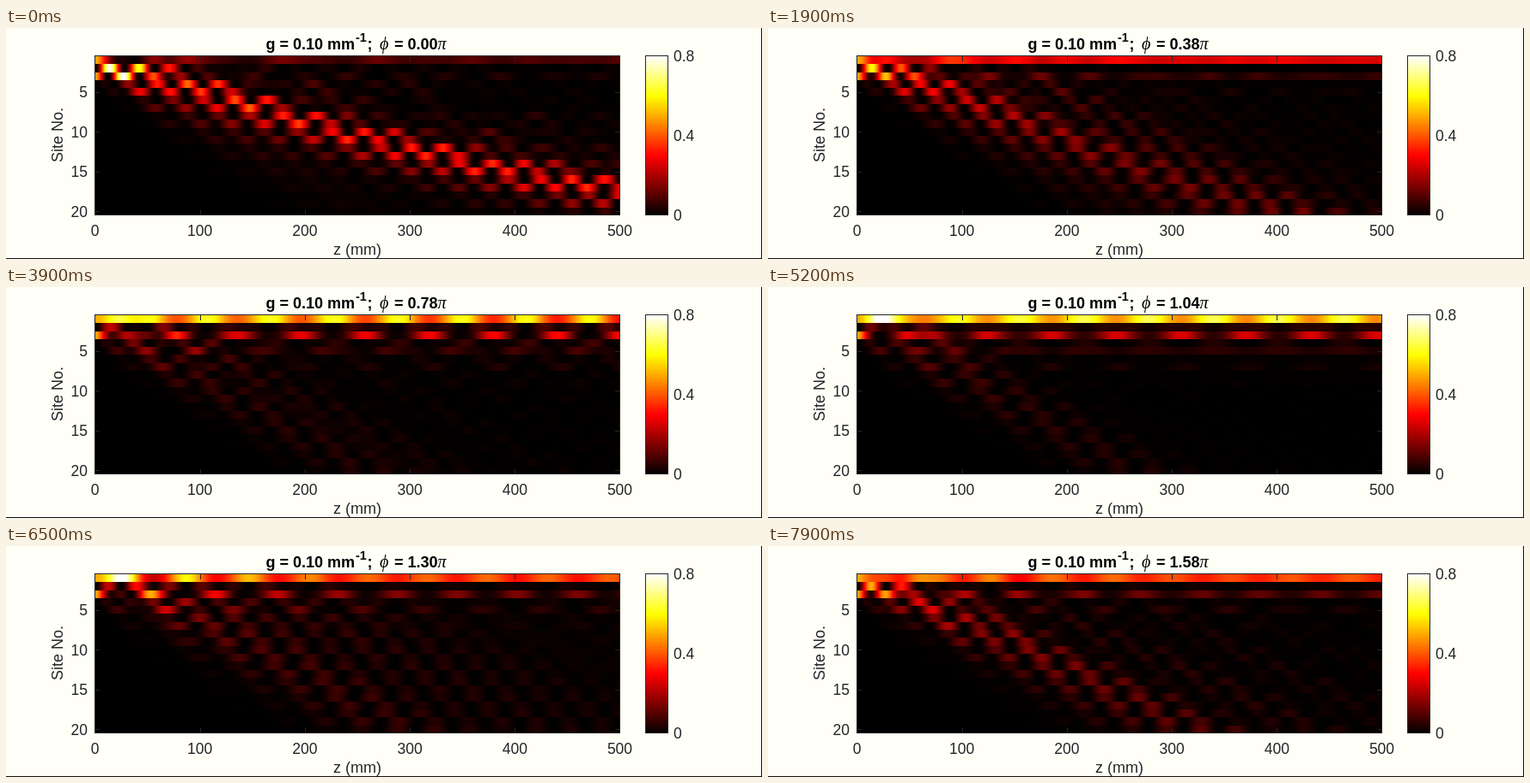
Animation of 880 by 270 pixels, one loop 8 s. Source, as an HTML page with a canvas:

```html
<!DOCTYPE html>
<html lang="en">
<head>
<meta charset="utf-8">
<title>Light in a dimerised lattice</title>
<style>
html, body { margin: 0; width: 880px; height: 270px; overflow: hidden; background: #fffff8; }
canvas, svg { position: absolute; left: 0; top: 0; display: block; }
text { font-family: "Liberation Sans", Arial, sans-serif; fill: #262626; white-space: pre; }
.tick { font-size: 17.5px; }
.label { font-size: 18px; }
.title { font-size: 18px; font-weight: bold; fill: #000; }
.sup { font-size: 14.4px; font-weight: bold; fill: #000; }
.greek { font-family: "Liberation Serif", "Times New Roman", serif; font-style: italic; font-size: 20px; fill: #000; }
</style>
</head>
<body>
<canvas id="stage" width="880" height="270"></canvas>
<svg id="labels" width="880" height="270"></svg>
<script>
const LEFT = 103, TOP = 33, W = 612, H = 186, ROWS = 20;
const BAR = { x: 745, w: 26 };
const LENGTH = 500, I_MAX = 0.8;
const SITES = 64, J1 = 0.04, J2 = 0.1, G = 0.1;
const STEP_MS = 100, STEPS = 80;

const ctx = document.getElementById("stage").getContext("2d");
const svg = document.getElementById("labels");

// black - red - yellow - white
function hot(v) {
  const c = x => 255 * Math.max(0, Math.min(1, x));
  return [c(v * 8 / 3), c(v * 8 / 3 - 1), c(v * 4 - 3)];
}

function label(str, x, y, cls, anchor = "start", turn = 0) {
  const el = document.createElementNS("http://www.w3.org/2000/svg", "text");
  el.textContent = str;
  el.setAttribute("class", cls);
  el.setAttribute("x", x);
  el.setAttribute("y", y);
  el.setAttribute("text-anchor", anchor);
  if (turn) el.setAttribute("transform", `rotate(${turn} ${x} ${y})`);
  svg.appendChild(el);
  return el;
}

const zToX = z => LEFT + 0.5 + z / LENGTH * (W - 1);
const siteToY = n => TOP + (n - 0.5) * H / ROWS;

label("g = 0.10 mm", 302.5, 25, "title");
label("-1", 407, 16, "sup");
label(";", 420.5, 25, "title");
label("ϕ", 435, 25, "greek");
label("=", 452, 25, "title");
const phaseText = label("0.00", 467.5, 25, "title");
label("π", 502.5, 25, "greek");
for (let z = 0; z <= LENGTH; z += 100) label(z, zToX(z), 243, "tick", "middle");
for (let n = 5; n <= ROWS; n += 5) label(n, 95, siteToY(n) + 6.3, "tick", "end");
["0.8", "0.4", "0"].forEach((s, i) => label(s, 777, TOP + i * H / 2 + 5.7, "tick"));
label("z (mm)", 409, 265, "label", "middle");
label("Site No.", 66, 125, "label", "middle", -90);

// d(psi)/dz = i (coupling + G |psi|^2 psi), real and imaginary parts interleaved
function slope(p, out) {
  for (let n = 0; n < SITES; n++) {
    const k = 2 * n;
    const a = n % 2 ? J1 : J2, b = n % 2 ? J2 : J1;
    const kerr = G * (p[k] * p[k] + p[k + 1] * p[k + 1]);
    let re = kerr * p[k], im = kerr * p[k + 1];
    if (n > 0) { re += a * p[k - 2]; im += a * p[k - 1]; }
    if (n < SITES - 1) { re += b * p[k + 2]; im += b * p[k + 3]; }
    out[k] = -im;
    out[k + 1] = re;
  }
}

const vec = () => new Float64Array(2 * SITES);
const k1 = vec(), k2 = vec(), k3 = vec(), k4 = vec(), tmp = vec();

function advance(p, h) {
  const shift = (k, s) => { for (let i = 0; i < p.length; i++) tmp[i] = p[i] + s * k[i]; };
  slope(p, k1);
  shift(k1, h / 2); slope(tmp, k2);
  shift(k2, h / 2); slope(tmp, k3);
  shift(k3, h); slope(tmp, k4);
  for (let i = 0; i < p.length; i++) p[i] += h / 6 * (k1[i] + 2 * k2[i] + 2 * k3[i] + k4[i]);
}

const map = ctx.createImageData(W, H);

function propagate(phi) {
  const p = vec();
  p[0] = Math.SQRT1_2;
  p[4] = Math.SQRT1_2 * Math.cos(phi);
  p[5] = Math.SQRT1_2 * Math.sin(phi);
  for (let x = 0; x < W; x++) {
    for (let y = 0; y < H; y++) {
      const k = 2 * Math.floor((y + 0.5) * ROWS / H);
      const c = hot((p[k] * p[k] + p[k + 1] * p[k + 1]) / I_MAX);
      const o = 4 * (y * W + x);
      map.data[o] = c[0];
      map.data[o + 1] = c[1];
      map.data[o + 2] = c[2];
      map.data[o + 3] = 255;
    }
    advance(p, LENGTH / (W - 1));
  }
}

function line(x1, y1, x2, y2) {
  ctx.beginPath();
  ctx.moveTo(x1, y1);
  ctx.lineTo(x2, y2);
  ctx.stroke();
}

function drawAxes() {
  ctx.strokeStyle = "#262626";
  ctx.lineWidth = 1;
  ctx.strokeRect(LEFT + 0.5, TOP - 0.5, W - 1, H);
  for (let z = 100; z < LENGTH; z += 100) {
    const x = Math.round(zToX(z)) + 0.5;
    line(x, TOP, x, TOP + 6);
    line(x, TOP + H - 6, x, TOP + H);
  }
  for (let n = 5; n <= ROWS; n += 5) {
    const y = Math.round(siteToY(n)) + 0.5;
    line(LEFT, y, LEFT + 6, y);
    line(LEFT + W - 6, y, LEFT + W, y);
  }
}

function drawBar() {
  for (let y = 0; y < H; y++) {
    ctx.fillStyle = `rgb(${hot(1 - (y + 0.5) / H).map(Math.round)})`;
    ctx.fillRect(BAR.x, TOP + y, BAR.w, 1);
  }
  ctx.strokeRect(BAR.x - 0.5, TOP - 0.5, BAR.w, H);
}

function draw(step) {
  const turns = step * 0.02;
  ctx.fillStyle = "#fffff8";
  ctx.fillRect(0, 0, 880, 270);
  propagate(turns * Math.PI);
  ctx.putImageData(map, LEFT, TOP);
  drawAxes();
  drawBar();
  ctx.fillStyle = "#111";
  ctx.fillRect(0, 269, 880, 1);
  ctx.fillRect(879, 0, 1, 270);
  phaseText.textContent = turns.toFixed(2);
}

let shown = 0;
const start = performance.now();
draw(0);

function tick() {
  const step = Math.floor(Math.max(0, performance.now() - start) / STEP_MS) % STEPS;
  if (step !== shown) draw(shown = step);
  requestAnimationFrame(tick);
}
requestAnimationFrame(tick);
</script>
</body>
</html>
```
